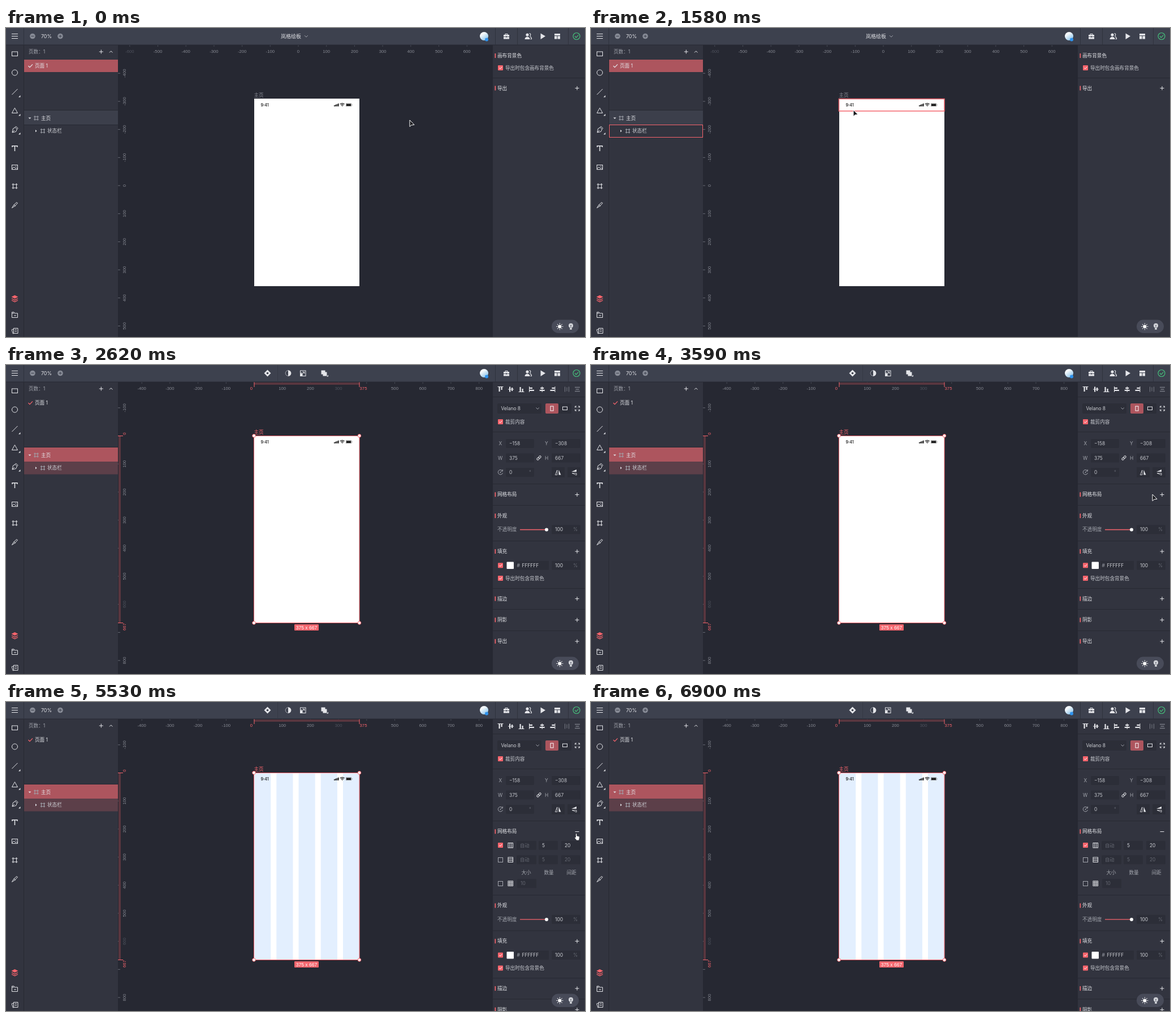
An HTML page that plays this animation: 1024 by 547 pixels, repeating every 7.68 s.

```html
<!DOCTYPE html>
<html lang="zh">
<head>
<meta charset="utf-8">
<title>Grid layout</title>
<style>
html, body { margin: 0; width: 100%; height: 100%; overflow: hidden; background: #262832; }
svg { display: block; width: 100vw; height: 100vh; }
text { font-family: Inter, "Noto Sans CJK SC", sans-serif; white-space: pre; }
.num { font-family: "Liberation Sans", Arial, sans-serif; }
</style>
</head>
<body>
<svg id="stage" viewBox="0 0 1024 547"></svg>
<script>
const RED = '#f5646c', ROW = '#ad555e', BAND = '#59363f', PANEL = '#32343f', DARK = '#262832';
const LINE = '#272932', FIELD = '#2c2e38', LIGHT = '#e4e5e9', MID = '#a2a5ad', DIM = '#666973';
const LOOP = 7680, UNIT = 49.7;

// drawing helpers
const rect = (x, y, w, h, fill, more = '') =>
  `<rect x="${x}" y="${y}" width="${w}" height="${h}" fill="${fill}" ${more}/>`;
const box = (x, y, w, h, stroke, sw = 1) =>
  rect(x, y, w, h, 'none', `stroke="${stroke}" stroke-width="${sw}"`);
const path = (d, stroke = LIGHT, sw = 1, fill = 'none') =>
  `<path d="${d}" fill="${fill}" stroke="${stroke}" stroke-width="${sw}"/>`;
const solid = (d, fill = LIGHT) => path(d, 'none', 0, fill);
const circle = (x, y, r, fill, stroke = 'none', sw = 1) =>
  `<circle cx="${x}" cy="${y}" r="${r}" fill="${fill}" stroke="${stroke}" stroke-width="${sw}"/>`;
const text = (x, y, s, fill = LIGHT, size = 8.6, more = '') =>
  `<text x="${x}" y="${(y + size * .36).toFixed(2)}" font-size="${size}" fill="${fill}" ${more}>${s}</text>`;
const group = (id, ...parts) => `<g id="${id}">${parts.join('')}</g>`;
const at = (x, y, ...parts) => `<g transform="translate(${x} ${y})">${parts.join('')}</g>`;

const plus = (x, y, c = LIGHT, r = 3.5) => path(`M${x - r} ${y}h${2 * r}M${x} ${y - r}v${2 * r}`, c);
const tick = (x, y, c = LIGHT) => path(`M${x - 3.5} ${y}l2.5 2.6 5-5.2`, c, 1.3);
const check = (y, on = true) => on
  ? rect(870, y - 4.5, 9, 9, RED, 'rx="1"') + path(`M872.2 ${y}l1.8 1.8 3.2-3.5`, '#fff')
  : box(870.5, y - 4, 8, 8, MID);
const rule = y => rect(861, y, 163, 1, LINE);
const head = (y, s) => rect(864.5, y - 4, 1.7, 8, RED) + text(869, y, s, LIGHT, 8.6, 'font-weight="500"');
const field = (x, y, w, s, c = LIGHT) => rect(x, y - 8, w, 16, FIELD, 'rx="1.5"') + text(x + 6, y, s, c, 8.4);
const hash = (x, y, c = LIGHT, r = 5, g = 3) =>
  path(`M${x - r} ${y - g}h${2 * r}M${x - r} ${y + g}h${2 * r}M${x - g} ${y - r}v${2 * r}M${x + g} ${y - r}v${2 * r}`, c);

// rulers: each axis has an origin, a range, hidden labels and one faded label
const mark = (x, y, s, c) => text(x, y, s, c, 7.7, 'class="num" text-anchor="middle"');
const side = (y, s, c) => `<g transform="translate(209 ${y}) rotate(-90)">${mark(0, 0, s, c)}</g>`;
function axis({ zero, from, to, hide = [], faded }, drawTick, drawLabel) {
  let out = '';
  for (let v = from; v <= to; v += 100) {
    const p = zero + v * UNIT / 100;
    out += drawTick(p);
    if (!hide.includes(v)) out += drawLabel(p, v, v === faded ? '#4f525d' : '#868992');
  }
  return out;
}
const ruler = (across, down) =>
  axis(across, x => rect(x - .5, 30, 1, 3, '#4b4e59'), (x, v, c) => mark(x, 41, v, c)) +
  axis(down, y => rect(198, y - .5, 4, 1, DIM), side);

const idleRuler = ruler({ zero: 517, from: -600, to: 600, faded: -600 }, { zero: 279, from: -400, to: 500 });
const selRuler = [
  ruler({ zero: 439, from: -400, to: 800, hide: [0, 400], faded: 300 },
    { zero: 125.5, from: -100, to: 800, hide: [0, 700], faded: 600 }),
  rect(439, 31, 186, 4, BAND), rect(438.5, 30, 1, 9, RED), rect(624.5, 30, 1, 9, RED),
  rect(199, 125, 4, 332, BAND), rect(198, 125, 9, 1, RED), rect(198, 456, 9, 1, RED),
  mark(434, 41, '0', RED), mark(632, 41, '375', RED), side(121.5, '0', RED), side(463.5, '667', RED)
].join('');

const toolIcons = [
  box(10.5, 42, 10, 7.5, LIGHT),
  circle(15.5, 79, 5, 'none', LIGHT),
  path('M10.5 118L20.5 108'),
  path('M15.5 141.5L20.5 150.5H10.5Z'),
  path('M11 185l1.5-7 4-2 3 3-2 4.5ZM16 175.5l1.5-1.5 3.5 3.5-1.5 1.5M11 185l4-4'),
  path('M11 211v-2.2h9v2.2M15.5 209v9', LIGHT, 1.5),
  box(10.5, 242.5, 10, 8, LIGHT) + path('M11 249l3-3 3 3 1.5-1.5 2 2') + circle(17.5, 245, .8, LIGHT),
  hash(15.5, 280),
  path('M10.5 318.5l3.5-5.5 5-4.5 1.5 1.5-4.5 5ZM14 313l2.5 2.3'),
  ...[122, 155, 188].map(y => solid(`M25.5 ${y - 3}v3.5h-3.5Z`)),
  solid('M15.5 473l6 3-6 3-6-3Z', RED),
  path('M10 479l5.5 2.7 5.5-2.7M10 482l5.5 2.7 5.5-2.7', RED, 1.3),
  path('M10.5 512.5v-9.5h3.5l1.5 2h5v7.5ZM14 509h4M10.5 505h4'),
  path('M13.5 531.5h7.5v9h-7.5ZM13.5 533l-3.3 1 2 7 2-.5M15.5 534h3.5M15.5 537h3.5')
].join('');

const topBar = [
  rect(0, 0, 1024, 30, '#3d414e'), rect(0, 29.5, 1024, 1, LINE),
  path('M10 10.5h11M10 14.5h11M10 18.5h11', LIGHT, 1.1),
  ...[31, 865, 904, 994].map(x => rect(x, 0, 1, 30, '#2f323d')),
  circle(47, 14.5, 4.8, '#868a95'), path('M44.5 14.5h5', '#3d414e'),
  circle(96, 14.5, 4.8, '#868a95'), plus(96, 14.5, '#3d414e', 2.5),
  text(62, 14.7, '70%', LIGHT, 8.8),
  circle(845.5, 14.5, 7.5, 'url(#sky)'), circle(850, 20.5, 3, '#2f93ee'),
  solid('M880 12h10v7.5h-10ZM882.5 12v-2h5v2h-1v-1h-3v1Z'), path('M880 15.5h10', '#3d414e', .8), rect(884, 14.5, 2, 2, '#3d414e'),
  circle(922, 12, 2.6, LIGHT), solid('M917.5 20c0-6 9-6 9 0Z'),
  path('M925.5 9.5c3 0 3 4.5 .5 5M927 15.5c2 .5 2.5 2 2.5 4h-2', LIGHT, 1.1),
  solid('M945.5 9.5l8.5 5-8.5 5.5Z'),
  solid('M970 10h10v3.3h-10ZM970 14.3h4.5v5.2h-4.5ZM975.5 14.3h4.5v5.2h-4.5Z'),
  circle(1009, 14.5, 6, 'none', '#45c27c', 1.2), path('M1006 14.5l2.3 2.3 4-4.2', '#45c27c', 1.2)
].join('');

const layerText = [
  solid('M39.5 158.5h5l-2.5 2.5Z'), hash(53.5, 159.5, MID, 4.2, 2.5), text(62, 159.5, '主页'),
  solid('M52 180l2.5 2.3-2.5 2.3Z'), hash(65, 182.3, MID, 4.2, 2.5), text(73, 182.3, '状态栏', '#cfd1d6')
].join('');

const statusIcons = [
  text(450.5, 136.3, '9:41', '#111', 7.2, 'font-weight="500"'),
  ...[0, 1, 2, 3].map(i => rect(580 + i * 2.3, 136.7 - i, 1.7, 2 + i, '#111')),
  path('M590.8 134.8q3.9-3 7.8 0M592.4 136.6q2.3-1.8 4.6 0', '#111', 1.2), solid('M593.4 137.6h2.6l-1.3 1.5Z', '#111'),
  box(601.2, 133.7, 9.6, 4.9, '#777', .6), rect(602, 134.4, 8, 3.5, '#111'), rect(611.4, 135.2, .9, 2, '#777')
].join('');

const columns = [0, 1, 2, 3, 4].map(i => rect(439 + i * 39.25, 125, 29.2, 332, '#e3effe')).join('');

const idleSide = [
  head(49, '画布背景色'), check(70.5), text(883, 70.5, '导出时包含画布背景色', '#c9cbd1'),
  rule(88), head(106.5, '导出'), plus(1010, 106.5)
].join('');

function alignIcons() {
  const bars = (a, b) => rect(-3, a[0], 2.2, a[1], LIGHT) + rect(1, b[0], 2.2, b[1], LIGHT);
  const vert = [
    rect(-5, -5, 10, 1, LIGHT) + bars([-4, 8], [-4, 5]),
    rect(-5, -.5, 10, 1, LIGHT) + bars([-4.5, 9], [-3, 6]),
    rect(-5, 4, 10, 1, LIGHT) + bars([-4, 8], [-1, 5])
  ];
  const turn = s => `<g transform="rotate(-90)">${s}</g>`;
  return vert.map((s, i) => at(874.5 + i * 18.5, 43, s)).join('') +
    vert.map((s, i) => at(930 + i * 18.2, 43, turn(s))).join('') +
    path('M988.5 38.5v9M995.5 38.5v9M992 39.5v7', '#777a84') + path('M1006 39.5h9M1006 46.5h9M1007.5 43h6', '#777a84', 1.4);
}

const link = x => rect(x, -1.7, 4.7, 3.4, 'none', `rx="1.7" stroke="${LIGHT}"`);
const selSide = [
  alignIcons(), rule(56),
  rect(869, 68, 78, 18, FIELD, 'rx="2"'), text(875.5, 77, 'Velano 8', '#cfd1d6', 8.4), path('M937.5 75.5l2.7 2.7 2.7-2.7', MID),
  rect(954, 68, 23, 18, ROW, 'rx="2"'), box(963, 73, 5, 8, '#fff'),
  rect(977, 68, 23, 18, FIELD, 'rx="2"'), box(984.5, 74, 8, 5.5, LIGHT),
  path('M1006.5 75.5v-2.5h2.5M1012 73h2.5v2.5M1014.5 78.5v2.5h-2.5M1009 81h-2.5v-2.5M1007 73.5l2 2M1014 73.5l-2 2M1014 80.5l-2-2M1007 80.5l2-2'),
  check(100.5), text(883, 101, '裁剪内容', '#c9cbd1'), rule(118),
  text(871.5, 139, 'X', MID, 8.4), field(884, 139, 50, '−158', '#c4c6cc'),
  text(953, 139, 'Y', MID, 8.4), field(965, 139, 51, '−308', '#c4c6cc'),
  text(870, 164.5, 'W', MID, 8.4), field(884, 164.5, 50, '375', '#c4c6cc'),
  text(953, 164.5, 'H', MID, 8.4), field(965, 164.5, 51, '667', '#c4c6cc'),
  `<g transform="translate(942.5 164.5) rotate(-45)">${link(-4.5)}${link(-.2)}</g>`,
  path('M878 187.5a4.2 4.2 0 1 0 .5 3.5M878.3 185v3h-3', MID), circle(874.5, 190, 1, MID),
  field(884, 190, 50, '0', '#c4c6cc'), text(925, 190, '°', DIM, 8.4),
  rect(965, 181, 23, 18, FIELD), rect(993, 181, 23, 18, FIELD),
  path('M974.8 186v8.5h-3.5Z', LIGHT, .8), solid('M977.5 185.5l4 9h-4Z'),
  path('M1009 191.5h-8l8 3.5Z', LIGHT, .8), solid('M1009 185v4h-9Z'),
  rule(210), head(229.3, '网格布局'), path('M1006.5 229.5h7')
].join('');

const gridSide = [
  check(253.5), box(888, 249.5, 8.5, 8.5, LIGHT), path('M890.8 249.5v8.5M893.7 249.5v8.5'),
  field(903, 253.7, 35, '自动', DIM), field(942, 253.7, 34, '5', '#cfd1d6'), field(982, 253.7, 34, '20', '#cfd1d6'),
  check(279.5, false), box(888, 275, 8.5, 8.5, LIGHT), path('M888 277.8h8.5M888 280.7h8.5'),
  field(903, 279.3, 35, '自动', DIM), field(942, 279.3, 34, '5', DIM), field(982, 279.3, 34, '20', DIM),
  text(911.5, 302.3, '大小', MID), text(951.5, 302.3, '数量', MID), text(991.5, 302.3, '间距', MID),
  check(321.5, false), box(888, 317, 8.5, 8.5, LIGHT), path('M890.8 317v8.5M893.7 317v8.5M888 319.8h8.5M888 322.7h8.5'),
  field(904, 321.3, 34, '10', DIM)
].join('');

const tail = [
  rule(248), head(267, '外观'), text(869, 291.3, '不透明度', MID), path('M909 291.5h47', RED, 1.3), circle(956, 291.5, 3, '#fff'),
  field(965, 291.3, 51, '100', '#cfd1d6'), text(1003, 291.3, '%', DIM, 8.4),
  rule(311), head(330, '填充'), plus(1010, 330),
  check(354.7), rect(885.5, 348.5, 12.5, 12.5, '#fff', 'rx="1"'), rect(901, 346.7, 59, 16, FIELD),
  text(903.5, 354.7, '#', MID, 8.4), text(912.5, 354.7, 'FFFFFF', '#cfd1d6', 8.4),
  field(965, 354.7, 51, '100', '#cfd1d6'), text(1003, 354.7, '%', DIM, 8.4),
  check(377.5), text(883, 377.5, '导出时包含背景色', '#c9cbd1'),
  rule(395), head(413.7, '描边'), plus(1010, 413.7),
  rule(432), head(451.3, '阴影'), plus(1010, 451.3),
  rule(470), head(489.2, '导出'), plus(1010, 489.2)
].join('');

const selTop = [
  solid('M462.5 8.5l6 6-6 6-6-6Z'), circle(462.5, 14.5, 1.8, '#3d414e'), rect(480, 0, 1, 30, '#353945'),
  circle(499, 14.5, 4.8, 'none', MID), solid('M499 9.2a5.3 5.3 0 0 1 0 10.6Z'),
  box(520.5, 10, 9.5, 9.5, LIGHT), path('M524 14h-3M522.5 17.5l5-5M524.5 12.3h3.2v3.2'), rect(520, 15, 4.5, 4.5, LIGHT),
  rect(557.5, 9.5, 7, 7, LIGHT), rect(560.5, 12.5, 7, 7, LIGHT), solid('M570 17.5v3h-3Z')
].join('');

const selFrame = [
  box(438.5, 125.5, 186.5, 331, RED),
  ...[[438.5, 125.3], [625, 125.3], [438.5, 456.5], [625, 456.5]].map(([x, y]) => circle(x, y, 2.8, '#fff', RED)),
  rect(510, 459, 43, 11, RED, 'rx="1"'),
  text(531.5, 464.6, '375 x 667', '#fff', 8.6, 'class="num" text-anchor="middle"')
].join('');

const rays = [0, 45, 90, 135, 180, 225, 270, 315]
  .map(a => `<path d="M4.2 0h1.8" stroke="#fff" transform="rotate(${a})"/>`).join('');

document.getElementById('stage').innerHTML = [
  '<defs><linearGradient id="sky" x1="0" y1="0" x2=".7" y2="1"><stop offset=".35" stop-color="#f4f8fb"/><stop offset="1" stop-color="#8cc4ea"/></linearGradient></defs>',
  rect(0, 0, 1024, 547, DARK),
  group('idleRuler', idleRuler),
  group('selRuler', selRuler),
  rect(439, 125, 186, 332, '#fff'), group('columns', columns), statusIcons,
  group('label', text(438.5, 119, '主页', 'currentColor')),
  group('hoverBar', box(438.5, 125.5, 186.5, 21.5, RED, 1.5)),
  group('hoverFrame', box(438.6, 125.1, 186.8, 331.5, RED, 1.6)),
  group('selFrame', selFrame),
  rect(0, 30, 198, 517, PANEL), rect(861, 30, 163, 517, PANEL), rect(31, 30, 1, 517, LINE), toolIcons,
  text(40, 42, '页数：1', MID), plus(168.3, 42), path('M183 43.5l2.7-2.7 2.7 2.7'),
  group('pageRow', rect(32, 56, 166, 22, ROW), tick(43, 67)), group('pageTick', tick(43, 67, RED)), text(51, 67, '页面 1'),
  rect(32, 145, 166, 1, LINE),
  group('idleRows', rect(32, 146, 166, 25, '#3c3f4b'), rect(32, 171, 166, 1, LINE)),
  group('selRows', rect(32, 146, 166, 25, ROW), rect(32, 171, 166, 22.5, '#5c3f49')),
  layerText,
  group('rowFrame', box(32.5, 148, 165, 24, RED)), group('rowBar', box(32.5, 171.5, 165, 22, RED)),
  topBar,
  group('idleTop', text(486, 14.7, '岚格绘板', LIGHT, 9), path('M528 13.2l2.9 2.9 2.9-2.9', MID)),
  group('selTop', selTop),
  group('idleSide', idleSide),
  group('selSide', selSide, group('addGrid', path('M1010 226v7')), group('gridSide', gridSide), group('tail', tail)),
  rect(965, 516.5, 48, 23.5, '#484b59', 'rx="11.7"'),
  at(979.3, 528.5, circle(0, 0, 3.1, '#fff'), rays),
  at(999, 528, circle(0, -1.3, 4, '#d5d7dc'), rect(-1.7, 2, 3.4, 4, '#d5d7dc'), path('M0 3v-4M-1.5-2.5L0-1l1.5-1.5', '#484b59', .8)),
  group('tip', rect(986, 242, 38, 20, '#4b4f5e', 'rx="2"'), text(996.5, 252.2, '添加')),
  group('arrow', path('M0 0v11.6l3-2.8 5-.5Z', '#fff', 1, '#15161b')),
  group('hand', path('M2.2 7V1.4q0-1.2 1.1-1.2t1.1 1.2v3l3.6 .9q1.2 .4 1 1.7l-.5 3.3-.6 2.2H3.8L.6 8.4q-.5-1 .3-1.5Z', '#22242c', .7, '#fff'))
].join('');

// pointer: [time, x, y, shape]
const moves = [
  [0, 714, 163, 'arrow'], [600, 696, 162, 'arrow'], [760, 640, 156, 'arrow'], [930, 575, 149, 'arrow'], [1110, 515, 143, 'arrow'],
  [1290, 482, 141, 'arrow'], [1430, 471, 142, 'arrow'], [1580, 464, 145, 'arrow'], [1730, 459, 151, 'arrow'], [2180, 0, 0, ''],
  [2640, 520, 160, 'arrow'], [2810, 645, 179, 'arrow'], [2980, 780, 198, 'arrow'], [3150, 897, 211, 'arrow'],
  [3290, 936, 218, 'arrow'], [3440, 970, 225, 'arrow'], [3590, 993, 229, 'arrow'], [3740, 1000, 231, 'arrow'],
  [3890, 1004, 232, 'arrow'], [4030, 1004, 232, 'hand'], [4180, 1005.3, 232.5, 'hand'],
  [5980, 998, 290, 'arrow'], [6160, 974, 368, 'arrow'], [6600, 978, 420, 'arrow'], [6750, 984, 471, 'arrow'], [6900, 0, 0, '']
];

const el = id => document.getElementById(id);
const show = (on, ...ids) => ids.forEach(id => { el(id).style.display = on ? '' : 'none'; });

function draw(t) {
  const within = (a, b) => t >= a && t < b;
  const chosen = t >= 2470, grid = t >= 5530;
  show(!chosen, 'idleRuler', 'pageRow', 'idleRows', 'idleTop', 'idleSide');
  show(chosen, 'selRuler', 'selFrame', 'pageTick', 'selRows', 'selTop', 'selSide');
  show(within(1430, 1730), 'hoverBar', 'rowBar');
  show(within(1730, 2470), 'hoverFrame', 'rowFrame');
  show(grid, 'columns', 'gridSide');
  show(!grid, 'addGrid');
  show(within(4630, 5530), 'tip');
  el('label').style.color = t >= 1730 ? RED : '#858892';
  el('tail').setAttribute('transform', `translate(0 ${grid ? 93.4 : 0})`);
  const [, x, y, shape] = moves.findLast(m => m[0] <= t);
  for (const id of ['arrow', 'hand']) {
    show(shape === id, id);
    el(id).setAttribute('transform', `translate(${x} ${y})`);
  }
}

const start = performance.now();
function frame() {
  draw((performance.now() - start) % LOOP);
  requestAnimationFrame(frame);
}
frame();
</script>
</body>
</html>
```
